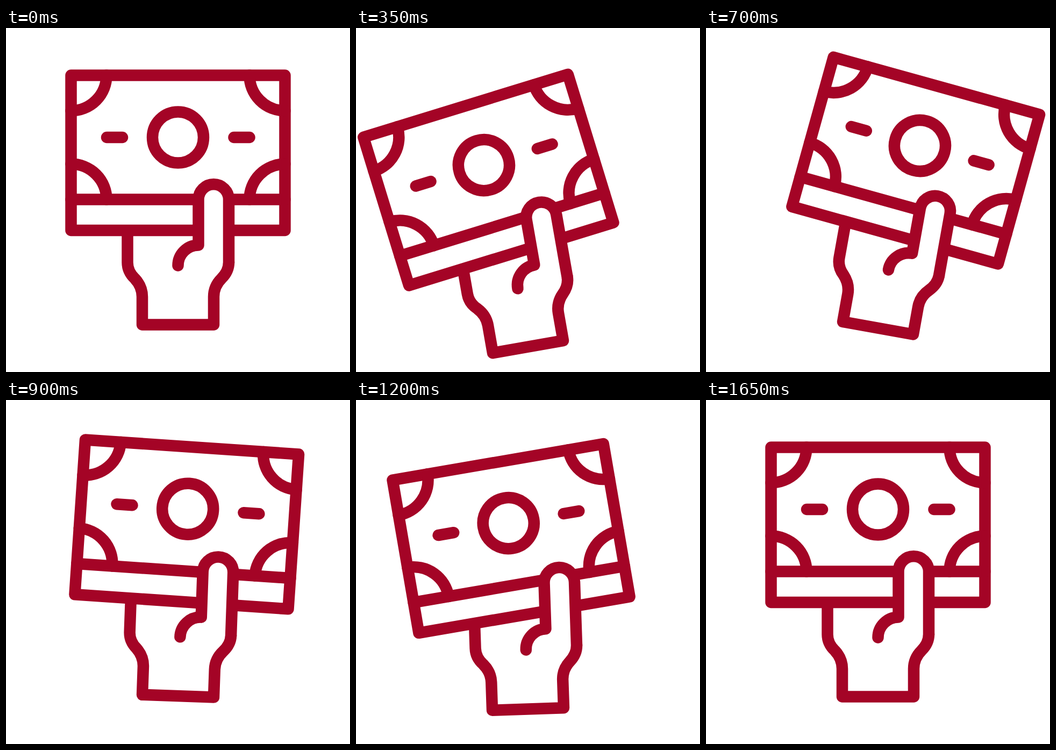
Recreate the animation shown at these times as an HTML page without scripts. Size 640 by 640 pixels, loop 2000 ms.

```html
<!DOCTYPE html>
<html lang="en">
<head>
<meta charset="utf-8">
<title>Waving banknotes</title>
<style>
  @property --t {
    syntax: "<number>";
    inherits: true;
    initial-value: 0;
  }

  html, body { margin: 0; height: 100%; overflow: hidden; background: #fff; }

  svg {
    display: block;
    width: 100vw;
    height: 100vh;
    fill: none;
    stroke: #a40426;
    stroke-width: 21.5;
    stroke-linecap: round;
    stroke-linejoin: round;
    animation: clock 2s steps(40) -8ms infinite;
  }

  /* --t counts milliseconds in 50 ms ticks */
  @keyframes clock { from { --t: 0; } to { --t: 2000; } }

  /* Each cosine is one eased move: (t - start) / duration */
  .hand {
    --drop: calc(
      -22.5 * cos(180deg * clamp(0, (var(--t) - 50) / 370, 1)) +
      23.15 * cos(180deg * clamp(0, (var(--t) - 450) / 340, 1)) -
      12.15 * cos(180deg * clamp(0, (var(--t) - 900) / 310, 1)) +
      11.5 * cos(180deg * clamp(0, (var(--t) - 1210) / 430, 1)));
    --swing: calc(
      5.05 * cos(180deg * clamp(0, (var(--t) - 50) / 325, 1)) -
      10.15 * cos(180deg * clamp(0, (var(--t) - 387) / 323, 1)) +
      8.6 * cos(180deg * clamp(0, (var(--t) - 750) / 310, 1)) -
      4.25 * cos(180deg * clamp(0, (var(--t) - 1060) / 250, 1)) +
      .75 * cos(180deg * clamp(0, (var(--t) - 1310) / 330, 1)));
    transform-origin: 320px 552px;
    transform: translateY(calc(var(--drop) * 1px)) rotate(calc(var(--swing) * 1deg));
  }

  .cash {
    --tilt: calc(
      3.6 * cos(180deg * clamp(0, (var(--t) - 50) / 320, 1)) -
      6.55 * cos(180deg * clamp(0, (var(--t) - 425) / 315, 1)) +
      6.85 * cos(180deg * clamp(0, (var(--t) - 750) / 410, 1)) -
      3.9 * cos(180deg * clamp(0, (var(--t) - 1200) / 440, 1)));
    transform-origin: 320px 384px;
    transform: rotate(calc(var(--tilt) * 1deg));
  }

  .solid { fill: #fff; }
</style>
</head>
<body>
<svg viewBox="0 0 640 640">
  <g class="hand">
    <path d="M226 350V436C226 447 231 458 239.500 466C248 475 253.500 487 253.500 500V552H386.500V500C386.500 487 392 475 401 466C409 458 414.500 447 414.500 436"/>
    <g class="cash">
      <path class="solid" d="M121 88H519V376.500H121Z"/>
      <path d="M121 319H519M187.500 203.500H216.500M424 203.500H453"/>
      <path d="M187 88A66 66 0 0 1 121 154M453 88A66 66 0 0 0 519 154M121 253A66 66 0 0 1 187 319M519 253A66 66 0 0 0 453 319"/>
      <circle cx="320" cy="203.500" r="47.500"/>
    </g>
    <path class="solid" d="M320 442C320 421 337 404 358 404V319A28.250 28.250 0 0 1 414.500 319V436"/>
  </g>
</svg>
</body>
</html>
```
